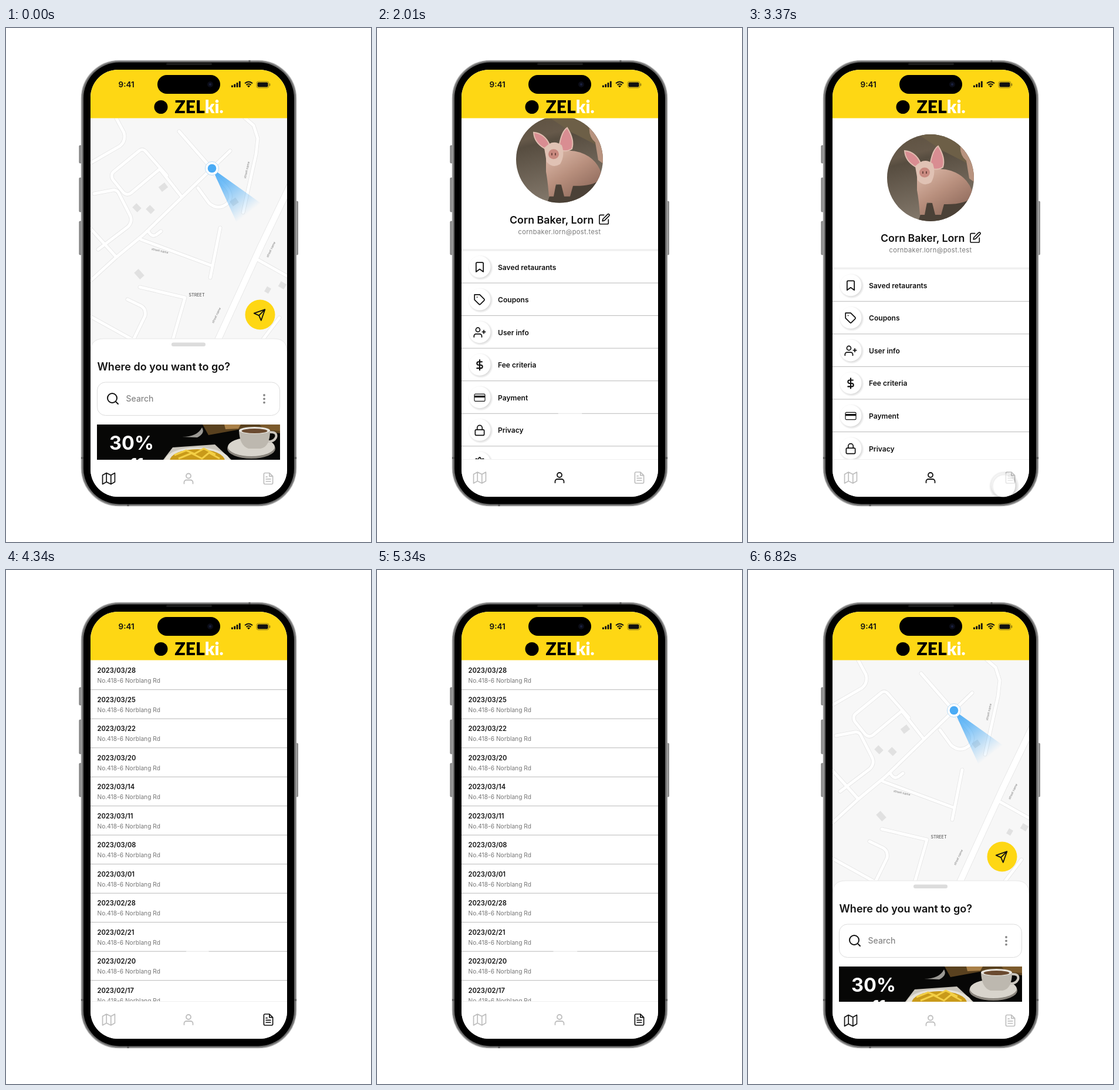
These frames come from a looping animation (622 px wide and 875 px high, 7.36 s). An HTML page:

```html
<!DOCTYPE html>
<html lang="en">
<head>
<meta charset="utf-8">
<title>App walkthrough</title>
<style>
html,body{margin:0;width:100%;height:100%;overflow:hidden;background:#fff}
svg{display:block;width:100vw;height:100vh;font-family:Inter,"Open Sans",sans-serif}
.icon{fill:none;stroke:#111;stroke-width:2;stroke-linecap:round;stroke-linejoin:round}
.b{font-weight:600;fill:#111}
.small{fill:#777}
</style>
</head>
<body>
<svg viewBox="0 0 622 875" xmlns="http://www.w3.org/2000/svg">
<defs>
  <clipPath id="screen"><rect x="144" y="71" width="335" height="727" rx="47"/></clipPath>
  <clipPath id="view"><rect x="144" y="153.500" width="335" height="581.500"/></clipPath>
  <clipPath id="face"><circle cx="311" cy="255" r="74"/></clipPath>
  <clipPath id="ad"><rect x="155" y="675" width="312" height="60"/></clipPath>
  <linearGradient id="beam" gradientUnits="userSpaceOnUse" x1="351" y1="239" x2="412" y2="316">
    <stop stop-color="#4aabf5"/><stop offset=".35" stop-color="#4aabf5" stop-opacity=".75"/><stop offset="1" stop-color="#4aabf5" stop-opacity="0"/>
  </linearGradient>
  <linearGradient id="yard" x2=".25" y2="1">
    <stop stop-color="#5d5140"/><stop offset=".28" stop-color="#66594a"/><stop offset=".36" stop-color="#574d40"/><stop offset="1" stop-color="#82776a"/>
  </linearGradient>
  <linearGradient id="skin" x2=".8" y2="1"><stop stop-color="#dfbcac"/><stop offset=".5" stop-color="#b88f7d"/><stop offset="1" stop-color="#8a6658"/></linearGradient>
  <radialGradient id="halo">
    <stop offset=".7" stop-color="#000" stop-opacity="0"/><stop offset=".74" stop-color="#000" stop-opacity=".17"/><stop offset="1" stop-color="#000" stop-opacity="0"/>
  </radialGradient>
</defs>
<rect width="622" height="875" fill="#fff"/>

<g id="phone">
  <g fill="#8c8c8c" stroke="#666" stroke-width=".6">
    <rect x="124.800" y="200" width="4" height="30" rx="1.200"/>
    <rect x="124.800" y="255" width="4" height="58" rx="1.200"/>
    <rect x="124.800" y="329" width="4" height="57" rx="1.200"/>
    <rect x="493.500" y="295" width="4" height="91" rx="1.200"/>
  </g>
  <rect x="128.500" y="55.500" width="366" height="758" rx="64.500" fill="#6c6c6c" stroke="#a8a8a8" stroke-width="1.500"/>
  <path d="M128 732h5M490 732h5M208 810v4M415 55v4" stroke="#555" stroke-width="3"/>
  <rect x="132" y="58.500" width="359" height="752" rx="61"/>
  <rect x="273" y="59.500" width="78" height="3.500" rx="1.700" fill="#1d1d1d"/>
</g>

<g clip-path="url(#screen)">
  <rect x="144" y="71" width="335" height="727" fill="#fff"/>
  <g clip-path="url(#view)">
    <g id="home">
      <rect x="144" y="153" width="335" height="400" fill="#f7f7f7"/>
      <g id="map">
        <g id="roads" fill="none" stroke-linejoin="round" stroke-linecap="round"></g>
        <g id="blocks" fill="#e1e1e1"></g>
        <g fill="#777" font-size="5.200" text-anchor="middle">
          <text transform="translate(262 381) rotate(13)">street name</text>
          <text transform="translate(412 242) rotate(-77)">street name</text>
          <text transform="translate(453 378) rotate(-64)">street name</text>
          <text transform="translate(360 490) rotate(-64)">street name</text>
          <text x="325" y="456.500" font-size="7.200" fill="#444">STREET</text>
        </g>
        <g id="pin">
          <path id="ray" d="M351 239L393 331L434 298Z" fill="url(#beam)"/>
          <circle cx="351" cy="239" r="11.500" fill="#fff" stroke="#b9dcf6"/>
          <circle cx="351" cy="239" r="7.300" fill="#4aabf5"/>
        </g>
      </g>
      <rect id="tint" x="144" y="153" width="335" height="257" fill="#fed714"/>
      <g id="send"><circle cx="433" cy="488" r="25.500" fill="#fed714"/></g>
      <path d="M144 760V551Q144 529 166 529H457Q479 529 479 551V760Z" fill="#fff" stroke="#e6e6e6"/>
      <rect x="282" y="535.500" width="58" height="6.500" rx="3.200" fill="#dcdcdc"/>
      <text class="b" x="155.500" y="583" font-size="18">Where do you want to go?</text>
      <rect x="155.500" y="603" width="311" height="56.500" rx="14" fill="#fff" stroke="#dcdcdc"/>
      <text x="204.500" y="636" font-size="14" font-weight="500" fill="#888">Search</text>
      <g fill="#888"><circle cx="440" cy="625" r="1.900"/><circle cx="440" cy="631.300" r="1.900"/><circle cx="440" cy="637.600" r="1.900"/></g>
      <g clip-path="url(#ad)">
        <rect x="155" y="675" width="312" height="60" fill="#070706"/>
        <path d="M335 675H467V690L400 683L345 693Z" fill="#59411f"/>
        <path d="M372 675H400L396 682L374 683Z" fill="#a98048"/>
        <path d="M432 675H467V686L440 684Z" fill="#7b5a2c"/>
        <path d="M300 696Q326 696 334 680Q340 690 326 697Z" fill="#9b9994"/>
        <path d="M284 714L356 709L384 735H268Z" fill="#c9c5bc"/>
        <ellipse cx="326" cy="738" rx="56" ry="24" fill="#e6e2d8"/>
        <ellipse cx="326" cy="737" rx="47" ry="20" fill="#c99a1a"/>
        <path d="M287 727l20-8 14 6 16-9 20 10M294 733l22-9 18 9 12-10 18 10" fill="none" stroke="#f3cf45" stroke-width="3"/>
        <ellipse cx="418" cy="716" rx="41" ry="17" fill="#8a857d"/>
        <ellipse cx="418" cy="713" rx="40" ry="16" fill="#d8d4cc"/>
        <path d="M448 688q15-1 12 9q-4 8-15 7" fill="none" stroke="#cbc6be" stroke-width="4"/>
        <path d="M397 685H450Q450 713 434 716H413Q398 711 397 685Z" fill="#bdb8af"/>
        <ellipse cx="423.500" cy="685" rx="26.500" ry="6" fill="#e9e6df"/>
        <ellipse cx="423.500" cy="686" rx="22" ry="4" fill="#6a4a30"/>
        <text x="176" y="718" font-size="32.500" font-weight="700" fill="#fff">30%</text>
        <text x="190" y="757" font-size="32" font-weight="700" fill="#fff">off</text>
      </g>
    </g>

    <g id="profile">
      <rect x="144" y="153" width="335" height="582" fill="#fff"/>
      <g id="menu">
        <g clip-path="url(#face)">
          <rect x="237" y="181" width="148" height="148" fill="url(#yard)"/>
          <path d="M290 181H385V236L330 208Z" fill="#6d5f47"/>
          <path d="M362 198Q368 180 385 190V262L377 256L372 226Q360 216 362 198Z" fill="#b8937f"/>
          <path d="M300 300Q340 290 385 294V329H290Z" fill="#4b4137"/>
          <path d="M288 252Q318 234 346 243Q378 254 384 286Q372 301 334 300L329 318H319L314 298L305 297L301 318H293Q291 292 288 276Z" fill="url(#skin)"/>
          <path d="M285 236Q268 226 267 209Q286 211 294 230ZM311 229Q315 207 324 201Q337 221 332 237Q322 243 313 239Z" fill="#d98d92" stroke="#e0bdb0" stroke-width="2"/>
          <path d="M285 236Q299 219 315 231Q321 248 312 263Q299 271 289 259Z" fill="#e0c2b4"/>
          <ellipse cx="301" cy="246" rx="9" ry="8.500" fill="#c98a80"/>
          <path d="M298 244v4M304 244v4" stroke="#704640" stroke-width="2"/>
        </g>
        <text class="b" x="226" y="364" font-size="17.800">Corn Baker, Lorn</text>
        <text class="small" x="311" y="382" font-size="11" letter-spacing=".4" text-anchor="middle">cornbaker.lorn@post.test</text>
        <rect x="144" y="407.500" width="335" height="3.500" fill="#f0f0f0"/>
      </g>
    </g>

    <g id="history">
      <rect x="144" y="153" width="335" height="582" fill="#fff"/>
      <g id="visits"></g>
    </g>
  </g>

  <rect x="144" y="735" width="335" height="63" fill="#fff"/>
  <path id="edge" d="M144 734.500H479" stroke="#f0f0f0"/>
  <g id="nav"></g>

  <rect x="144" y="71" width="335" height="82.500" fill="#fed714"/>
  <rect x="258" y="80" width="107" height="32" rx="16"/>
  <circle cx="348" cy="96" r="5" fill="#0b0d18"/><circle cx="348" cy="96" r="2" fill="#1a2140"/>
  <text x="191.500" y="100.500" font-size="13.500" class="b">9:41</text>
  <g fill="#111">
    <rect x="384" y="97.500" width="2.800" height="3.500" rx=".8"/><rect x="388.300" y="95.500" width="2.800" height="5.500" rx=".8"/>
    <rect x="392.600" y="93" width="2.800" height="8" rx=".8"/><rect x="396.900" y="90.500" width="2.800" height="10.500" rx=".8"/>
    <rect x="428.500" y="92.500" width="18" height="8" rx="2"/>
  </g>
  <path d="M407 94.300Q413.500 88.600 420 94.300M409.500 97Q413.500 93.600 417.500 97" fill="none" stroke="#111" stroke-width="2"/>
  <path d="M411 98.600Q413.500 96.700 416 98.600L413.500 101.300Z"/>
  <rect x="427" y="91" width="21" height="11" rx="3.300" fill="none" stroke="#111" stroke-opacity=".4"/>
  <path d="M449.500 94.500v4" stroke="#111" stroke-opacity=".5" stroke-width="1.500"/>
  <circle cx="264" cy="134.500" r="11.500"/>
  <text x="287.500" y="145" font-family="Lato,sans-serif" font-weight="900" font-size="30">ZEL<tspan fill="#fff">ki.</tspan></text>
</g>

<g id="touch">
  <circle id="shade" cx="1.500" cy="2" r="26" fill="url(#halo)"/>
  <circle r="20.500" fill="#fff" fill-opacity=".62"/>
</g>
</svg>
<script>
const $ = id => document.getElementById(id);
const add = (id, html) => $(id).insertAdjacentHTML('beforeend', html);

// Icons on a 24-unit grid
function gear() {
  let d = '';
  for (let i = 0; i < 32; i++) {
    const a = (i - .5) * Math.PI / 16, r = i % 4 < 2 ? 10.5 : 7.8;
    d += (i ? 'L' : 'M') + (12 + r * Math.cos(a)).toFixed(2) + ' ' + (12 + r * Math.sin(a)).toFixed(2);
  }
  return d + 'ZM15 12a3 3 0 1 1-6 0a3 3 0 1 1 6 0';
}
const shapes = {
  map: 'M1 6v16l7-4 8 4 7-4V2l-7 4-8-4ZM8 2v16M16 6v16',
  user: 'M19.500 20.500v-2a4 4 0 0 0-4-4h-7a4 4 0 0 0-4 4v2M16 7.500a4 4 0 1 1-8 0a4 4 0 1 1 8 0',
  doc: 'M14 2H6a2 2 0 0 0-2 2v16a2 2 0 0 0 2 2h12a2 2 0 0 0 2-2V8ZM14 2v6h6M16 13H8M16 17H8M10 9H8',
  search: 'M19 11a8 8 0 1 1-16 0a8 8 0 1 1 16 0M21 21l-4.400-4.400',
  send: 'M22 2L11 13M22 2l-7 20-4-9-9-4Z',
  edit: 'M11 4H4a2 2 0 0 0-2 2v14a2 2 0 0 0 2 2h14a2 2 0 0 0 2-2v-7M18.500 2.500a2.100 2.100 0 0 1 3 3L12 15l-4 1 1-4Z',
  mark: 'M19 21l-7-5-7 5V5a2 2 0 0 1 2-2h10a2 2 0 0 1 2 2Z',
  tag: 'M20.600 13.400l-7.200 7.200a2 2 0 0 1-2.800 0L2 12V2h10l8.600 8.600a2 2 0 0 1 0 2.800ZM7 7h.010',
  plus: 'M16 21v-2a4 4 0 0 0-4-4H5a4 4 0 0 0-4 4v2M12.500 7a4 4 0 1 1-8 0a4 4 0 1 1 8 0M20 8v6M23 11h-6',
  fee: 'M12 1v22M17 5H9.500a3.500 3.500 0 0 0 0 7h5a3.500 3.500 0 0 1 0 7H6',
  card: 'M3 4.500h18a2 2 0 0 1 2 2v11a2 2 0 0 1-2 2H3a2 2 0 0 1-2-2v-11a2 2 0 0 1 2-2ZM1 8.500h22M1 9.700h22M1 11h22',
  lock: 'M5 11h14a2 2 0 0 1 2 2v7a2 2 0 0 1-2 2H5a2 2 0 0 1-2-2v-7a2 2 0 0 1 2-2ZM7 11V7a5 5 0 0 1 10 0v4',
  gear: gear()
};
const icon = (name, x, y, s = 1, w = 2, id = '') =>
  `<path id="${id}" class="icon" d="${shapes[name]}" style="stroke-width:${w}" transform="translate(${x - 12 * s} ${y - 12 * s}) scale(${s})"/>`;

add('send', icon('send', 432, 488.5, .93));
add('home', icon('search', 182, 631));
add('menu', icon('edit', 387.5, 356.5, .85));
add('nav', icon('map', 175, 765.5, .95, 1.8, 'navMap') + icon('user', 311, 765.5, 1, 1.8, 'navUser') + icon('doc', 447, 765.5, .95, 1.8, 'navDoc'));

// Street map
const roads = [
  'M186 150L201 178Q205 192 194 201L142 231',
  'M274 251L237 209Q232 205 227 209L183 245Q178 250 182 258L200 280Q206 286 213 281L262 240',
  'M142 432L188 390L234 352L300 288L382 209',
  'M295 176L351 240M262 240L300 288',
  'M406 152L422 166L429 188L426 215L404 314',
  'M327 272L346 298Q362 312 378 298Q388 285 375 270L352 245',
  'M430 395L482 424M365 340L348 425M230 360L349 404',
  'M242 345Q248 357 256 352L264 346',
  'M150 282L182 276Q189 275 192 281L212 320Q216 331 207 339L157 377M142 339L188 390',
  'M228 441L305 459L283 535',
  'M207 462L230 473Q239 478 237 490L215 535M142 490L218 532',
  'M466 493L434 535'
].join('');
const avenue = 'M484 268L434 372L358 538';
[[roads, '#e4e4e4', 6.6], [avenue, '#e4e4e4', 12], [roads, '#fff', 5], [avenue, '#fff', 10.4]].forEach(([d, c, w]) =>
  add('roads', `<path d="${d}" stroke="${c}" stroke-width="${w}"/>`));
[[223, 306, 12, 45], [246, 309, 12, 45], [268, 271, 13, -38], [227, 419, 15, 48], [389, 296, 12, -35], [446, 446, 8, 30], [471, 438, 11, 30]].forEach(([x, y, w, r]) =>
  add('blocks', `<rect x="${-w / 2}" y="-5" width="${w}" height="10" transform="translate(${x} ${y}) rotate(${r})"/>`));

// Profile menu: icon, label, icon scale, line width
[['mark', 'Saved retaurants', .88, 2], ['tag', 'Coupons', .88, 2], ['plus', 'User info', .88, 2], ['fee', 'Fee criteria', .78, 2.7],
 ['card', 'Payment', .82, 1.4], ['lock', 'Privacy', .85, 2], ['gear', 'Settings', .88, 2]].forEach(([name, label, size, w], i) => {
  const y = 438.3 + i * 55.55;
  add('menu', `<circle cx="176.500" cy="${y + 1}" r="21.500" fill="url(#halo)"/><circle cx="175" cy="${y - .5}" r="18.500" fill="#fff"/>
    ${icon(name, 175, y, size, w)}
    <text class="b" x="206" y="${y + 4.5}" font-size="12.100">${label}</text>
    <path d="M144 ${y + 27}H479" stroke="#b9b9b9"/>`);
});

// Visit history
'03/28 03/25 03/22 03/20 03/14 03/11 03/08 03/01 02/28 02/21 02/20 02/17 02/11 02/10'.split(' ').forEach((day, i) => {
  const y = 154.4 + i * 49.5;
  add('visits', `<text class="b" x="155.500" y="${y + 20.6}" font-size="11.200">2023/${day}</text>
    <text class="small" x="155.500" y="${y + 38}" font-size="10.200">No.418-6 Norblang Rd</text>
    <path d="M144 ${y + 49.3}H479" stroke="#b9b9b9"/>`);
});

const LOOP = 7360, FADE = 350;
const ramp = (t, a, b) => Math.min(1, Math.max(0, (t - a) / (b - a)));
// cubic-bezier(.25, .1, .25, 1)
function ease(p) {
  if (p <= 0 || p >= 1) return p;
  let lo = 0, hi = 1, s = p;
  for (let i = 0; i < 18; i++) {
    s = (lo + hi) / 2;
    const x = .75 * s * (1 - s) + s * s * s;
    x < p ? lo = s : hi = s;
  }
  return .3 * s * (1 - s) * (1 - s) + 3 * s * s * (1 - s) + s * s * s;
}
// Finger path: time, x, y
const path = [
  [200, 650, 502], [760, 322, 766], [1250, 322, 766], [1730, 329, 690], [1850, 329, 690], [2410, 329, 626],
  [2570, 329, 626], [2990, 329, 690], [3290, 435, 778], [4020, 435, 778], [4460, 321, 650], [4500, 321, 650],
  [4860, 321, 529], [4940, 321, 529], [5340, 321, 650], [5700, 178, 766], [7360, 178, 766]
];
function finger(t) {
  if (t <= path[0][0]) return path[0].slice(1);
  const i = path.findIndex(k => k[0] >= t), [t0, x0, y0] = path[i - 1], [t1, x1, y1] = path[i];
  const p = ease(ramp(t, t0, t1));
  return [x0 + (x1 - x0) * p, y0 + (y1 - y0) * p];
}
const move = (id, x, y) => $(id).setAttribute('transform', `translate(${x} ${y})`);
const fade = (id, o) => {
  $(id).style.display = o > 0 ? '' : 'none';
  $(id).style.opacity = o;
};

function draw(t) {
  const step = at => ramp(t, at, at + FADE);
  const toProfile = step(1050), toHistory = step(3740), toHome = step(5900);
  const a = ease(toProfile), [x, y] = finger(t);

  const lift = toHome ? 0 : a;
  fade('home', 1 - .65 * lift);
  move('map', 0, -75 * lift);
  move('pin', 0, -12 * lift);
  move('send', 2 * lift, -5 * lift);
  fade('ray', 1 - lift);
  fade('tint', .3 * lift);

  fade('profile', toHistory < 1 ? a : 0);
  fade('history', ease(toHistory) * (1 - ease(toHome)));
  move('menu', 0, -4 * (1 - a) - (t > 1850 && t < 2990 ? 690 - y : 0));
  move('visits', 0, t > 4500 && t < 5340 ? y - 650 : 0);

  const home = 1 - toProfile + toHome;
  move('nav', 0, 1.5 * home);
  fade('edge', 1 - home);
  const tint = (id, w) => { $(id).style.opacity = .27 + .73 * w; };
  tint('navMap', home);
  tint('navUser', toProfile - toHistory);
  tint('navDoc', toHistory - toHome);

  move('touch', x, y);
  fade('touch', t < 200 ? 0 : 1 - ramp(t, 5900, 6100));
  fade('shade', 1 - ramp(t, 1250, 1450) + ramp(t, 2990, 3200) - ramp(t, 3740, 4020));
}

const start = performance.now();
function tick() {
  draw((performance.now() - start) % LOOP);
  requestAnimationFrame(tick);
}
tick();
</script>
</body>
</html>
```
